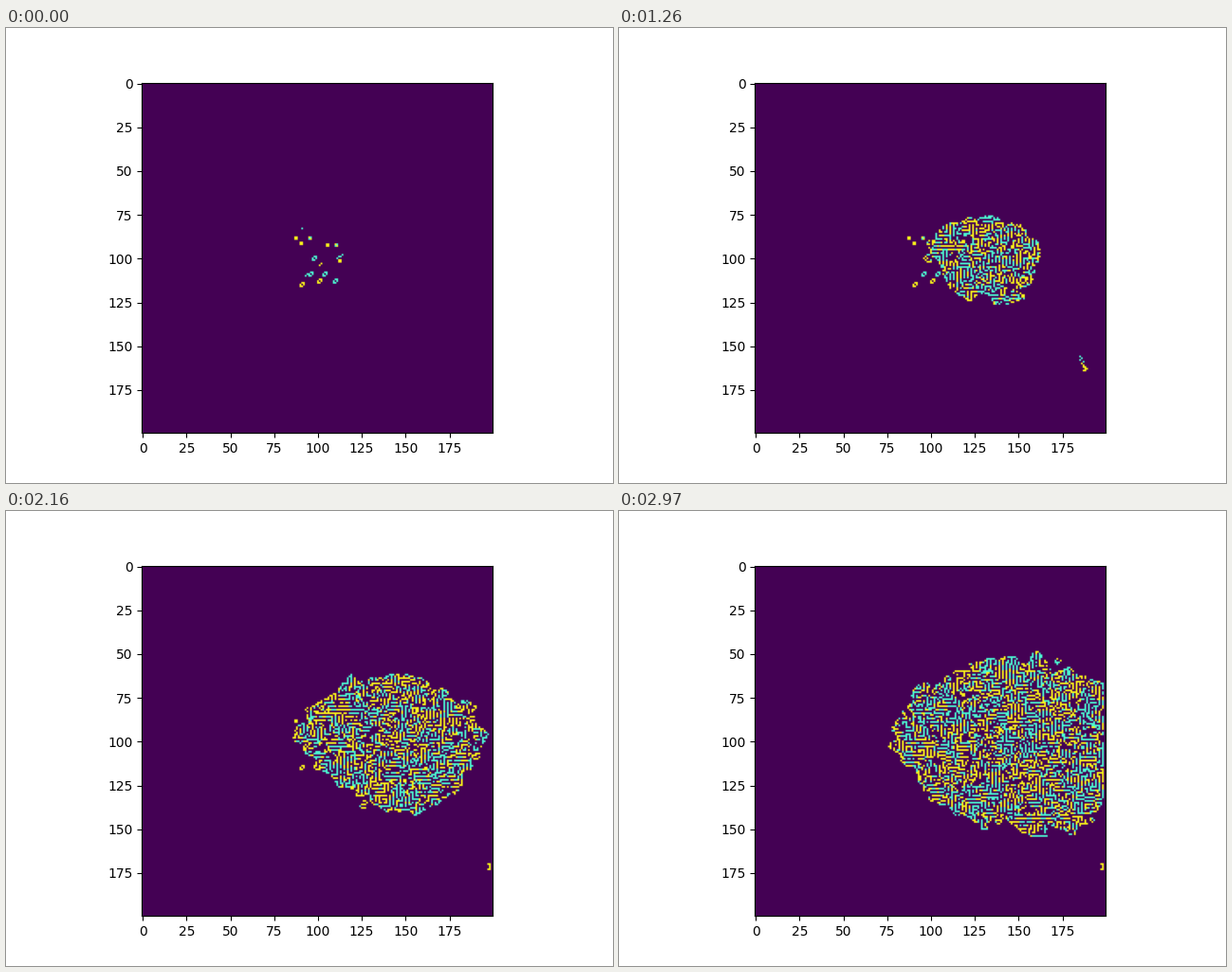
A matplotlib script for the animation above (3000 ms loop, 640 by 480 pixels).

```python
import numpy as np
import matplotlib.pyplot as plt
from matplotlib.animation import FuncAnimation

SIZE, FRAMES, STEP_MS = 200, 100, 30
COLORS = np.array([(68, 1, 84), (75, 247, 210), (248, 242, 25)], np.uint8)
EMPTY, CYAN, YELLOW = range(3)
rng = np.random.default_rng(7)
yy, xx = np.mgrid[:SIZE, :SIZE]

BLOCK = np.ones((2, 2), int)
MIXED = BLOCK + np.eye(2, dtype=int)
SHIP = np.array([(0, 1, 1), (1, 0, 1), (1, 1, 0)])
SPARK = np.eye(2, dtype=int)[::-1]
HOOK = np.array([(1, 1), (0, 1), (0, 1), (1, 1)])

# Resting bodies: shape and the corners where it stands
RESTING = [
    (BLOCK * YELLOW, [(87, 88), (90, 91), (105, 92), (112, 101)]),
    (MIXED, [(95, 88), (110, 92)]),
    (SHIP, [(97, 99), (95, 108), (103, 108), (109, 112)]),
    (SHIP * YELLOW, [(90, 114), (100, 112)]),
    (SPARK, [(111, 99), (113, 98)]),
]
FADING = [
    (BLOCK[:1, :1], [(91, 83)]),
    (SPARK, [(93, 109)]),
    (SPARK * YELLOW, [(101, 103)]),
]
LAUNCH, LANDING = 12, 46


def noise(sigma):
    k = np.fft.fftfreq(SIZE)
    blur = np.exp(-2 * (np.pi * sigma) ** 2 * (k[:, None] ** 2 + k ** 2))
    field = np.fft.ifft2(np.fft.fft2(rng.normal(size=(SIZE, SIZE))) * blur).real
    return field / field.std()


def drifting(sigma, speed):
    a, b = noise(sigma), noise(sigma)
    return lambda n: np.cos(n * speed) * a + np.sin(n * speed) * b


def colony(n):
    """Four rounded quarters, each side spreading at its own pace."""
    start = 6.5 * (1 - np.exp(-n / 6)) + 0.01
    low = yy > 98
    dx = xx - (119 + np.where(low, 0.5, 0.3) * n)
    dy = yy - 98
    left = start + np.where(low, 0.85, 0.65) * n
    right = 0.01 + np.where(low, 0.54, 0.74) * n
    wide = np.where(dx < 0, left, right)
    high = start + np.where(low, 0.5, 0.41) * n
    dist = ((abs(dx) / wide) ** 1.7 + (abs(dy) / high) ** 1.7) ** (1 / 1.7)
    return (dist < 1 + 2.2 * edge(n) / (12 + 0.5 * n)) & (xx < SIZE - 1)


def step(alive):
    count = sum(np.roll(alive, (i, j), (0, 1)).astype(int)
                for i in (-1, 0, 1) for j in (-1, 0, 1)) - alive
    return np.where(alive, (count >= 1) & (count <= 4), count == 3)


def stamp(grid, mask, shapes):
    for shape, corners in shapes:
        h, w = shape.shape
        for x, y in corners:
            area = slice(y, y + h), slice(x, x + w)
            if not mask[area].any():
                grid[area] = np.maximum(grid[area], shape)


def draw_runner(grid, mask, n):
    lead = round(2.05 * (n - 32))
    for k in range(9):
        x, y = 165 + lead + k // 3 + (k + n) % 2, 136 + lead + k
        color = CYAN if k < 4 else YELLOW
        stamp(grid, mask, [(BLOCK[:1, :1 + k // 6] * color, [(x, y)])])


def simulate():
    alive = old = np.zeros((SIZE, SIZE), bool)
    history = []
    for n in range(FRAMES):
        mask = colony(n)
        soup = rng.random((SIZE, SIZE)) < 0.4
        renew = (mask & ~old) | (noise(2) > 1)
        room = mask & (holes(n) < 1.6)
        alive = np.where(renew, soup, alive) & room
        for _ in range(3):
            alive = step(alive) & room
        shown = alive & (rng.random((SIZE, SIZE)) > 0.08)
        grid = np.where(shown, np.where(tint(n) > 0, YELLOW, CYAN), EMPTY)
        stamp(grid, mask, RESTING)
        if n < 10:
            stamp(grid, mask, FADING)
        if LAUNCH <= n < LANDING:
            draw_runner(grid, mask, n)
        elif n >= LANDING:
            stamp(grid, mask, [(HOOK * YELLOW, [(197, 170)])])
        history.append(grid)
        old = mask
    return history


edge = drifting(2.2, 0.06)
holes = drifting(1.3, 0.07)
tint = drifting(1.1, 0.09)
history = simulate()

fig, ax = plt.subplots(figsize=(6.4, 4.8), dpi=100)
image = ax.imshow(COLORS[history[0]])


def update(n):
    image.set_data(COLORS[history[n]])
    return (image,)


anim = FuncAnimation(fig, update, frames=FRAMES, interval=STEP_MS,
                     repeat=True, repeat_delay=0)
plt.show()
```
